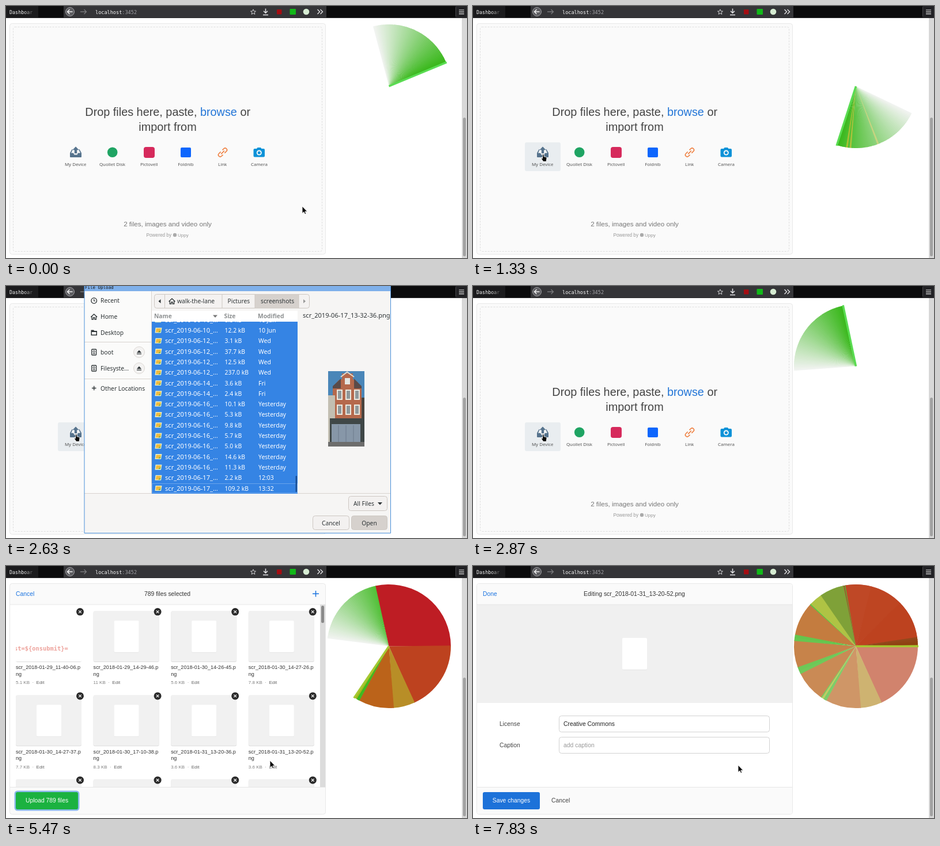
Recreate the animation shown at these times as an HTML page with a canvas. Size 800 by 438 pixels, loop 8000 ms.

```html
<!DOCTYPE html>
<html lang="en">
<head>
<meta charset="utf-8">
<title>Dashboard</title>
<style>
html, body { margin: 0; width: 100%; height: 100%; overflow: hidden; background: #fff; }
#stage { position: absolute; left: 0; top: 0; width: 800px; height: 438px; overflow: hidden; }
#stage > * { position: absolute; left: 0; top: 0; display: block; }
#stage > canvas { left: 552px; top: 27px; }
text { white-space: pre; }
.a { font-family: "Liberation Sans", Arial, sans-serif; }
.n { font-family: "Noto Sans", "Open Sans", sans-serif; }
.m { font-family: "DejaVu Sans Mono", monospace; }
</style>
</head>
<body>
<div id="stage">
  <svg id="page" width="800" height="438"></svg>
  <canvas id="wheel" width="225" height="225"></canvas>
  <svg id="over" width="800" height="438"></svg>
</div>
<script>
const $ = id => document.getElementById(id);
const text = (x, y, s, size, fill, cls = 'a', more = '') =>
  `<text x="${x}" y="${y}" font-size="${size}" fill="${fill}" class="${cls}" ${more}>${s}</text>`;
const rect = (x, y, w, h, fill, r = 0, stroke = 'none', more = '') =>
  `<rect x="${x}" y="${y}" width="${w}" height="${h}" fill="${fill}" rx="${r}" stroke="${stroke}" ${more}/>`;
const line = (d, stroke, w = 1, more = '') =>
  `<path d="${d}" fill="none" stroke="${stroke}" stroke-width="${w}" ${more}/>`;
const shape = (d, fill, more = '') => `<path d="${d}" fill="${fill}" ${more}/>`;
const dot = (x, y, r, fill, more = '') => `<circle cx="${x}" cy="${y}" r="${r}" fill="${fill}" ${more}/>`;
const clip = (x, y, w, h, inner) => `<svg x="${x}" y="${y}" width="${w}" height="${h}">${inner}</svg>`;
const group = (id, inner) => `<g id="${id}">${inner}</g>`;
const mid = 'text-anchor="middle"';
const blue = '#1a73e0';

// ---- browser chrome
function chrome() {
  return rect(0, 0, 800, 21, '#0b0b0c') + rect(0, 0, 56, 20, '#1b1b1d') + rect(100, 0, 456, 20, '#353538') +
    rect(780, 0, 20, 20, '#222225') + rect(0, 20, 800, 1, '#2a2a2c') +
    '<defs><linearGradient id="fade" gradientUnits="userSpaceOnUse" x1="30" x2="48" y1="0" y2="0">' +
    '<stop stop-color="#f4f4f4"/><stop offset="1" stop-color="#444"/></linearGradient></defs>' +
    text(6, 13.5, 'Dashboar', 8.4, 'url(#fade)', 'm') +
    text(155, 13.5, 'localhost<tspan fill="#a0a0a4">:3452</tspan>', 8.55, '#f6f6f6', 'm') +
    dot(111, 10, 7.500, '#5c5c60', 'stroke="#a0a0a4"') + line('M115.500 10H107M110.500 6L106.500 10L110.500 14', '#f0f0f0', 1.5) +
    line('M129 10H139.500M135.500 6L139.500 10L135.500 14', '#78787b', 1.3) +
    line('M429 5.800L430.300 8.900L433.500 9.100L431 11.200L431.900 14.400L429 12.600L426.100 14.400L427 11.200L424.500 9.100L427.700 8.900Z', '#d0d0d2', 1) +
    line('M450.500 4.500V12M447 8.800L450.500 12.300L454 8.800M446 15.500H455', '#e4e4e6', 1.5) +
    rect(470, 6, 8.500, 8.500, '#a40d12', 1) + rect(492.500, 5, 10.500, 10, '#12b818', 1) +
    dot(521, 10, 5.300, '#d6ecd2') +
    line('M540.500 6L544.500 10L540.500 14M545.500 6L549.500 10L545.500 14', '#e4e4e6', 1.4) +
    line('M780.500 2V18', '#4a4a4c') + line('M786 7H795M786 10.300H795M786 13.600H795', '#eee', 1.2) +
    rect(791, 21, 9, 417, '#d8d8d8') + rect(793, 194, 5, 241, '#a2a2a2', 2.500);
}

// ---- drop area
function dropArea() {
  const labels = ['My Device', 'Quollet Disk', 'Pictovell', 'Foldnib', 'Link', 'Camera'];
  let s = rect(12.5, 36.5, 536, 390, 'none', 3, '#dedede', 'stroke-dasharray="3 2"') +
    text(280.700, 191, 'Drop files here, paste, <tspan fill="#2275d7">browse</tspan> or', 19.85, '#444', 'a', mid) +
    text(280.500, 217, 'import from', 19.85, '#444', 'a', mid) +
    group('hover', rect(90, 237, 62, 50, '#e9edf0', 3));
  labels.forEach((l, i) => s += text(120.700 + 63.75 * i, 277.700, l, 7.9, '#555', 'n', mid));
  return s +
    shape('M114.500 249H127.500L131 255.500V262Q131 263 130 263H112Q111 263 111 262V255.500Z', '#56738d') +
    shape('M115.500 250.500H126.500L129 255.500H125L123.500 258.500H118.500L117 255.500H113Z', '#fafafa') +
    shape('M121 244L127 250.500H123.500V256.500H118.500V250.500H115Z', '#56738d', 'stroke="#fafafa" stroke-width=".6"') +
    dot(184.700, 254.300, 8.800, '#1fa463') + rect(239, 245, 19, 19, '#d62a5c', 4) + rect(303, 246, 18, 17, '#0d66fd', 2) +
    '<g transform="translate(376 254.500) rotate(-45)" fill="none" stroke="#ef8143" stroke-width="1.7">' +
    '<path d="M-1.500 -3.200H-6a3.200 3.200 0 0 0 0 6.400H-2.500M1.500 3.200H6a3.200 3.200 0 0 0 0 -6.400H2.500M-4 0H4"/></g>' +
    shape('M431.500 248H435L436.500 246H442L443.500 248H447Q449 248 449 250V260.500Q449 262.500 447 262.500H431.500Q429.500 262.500 429.500 260.500V250Q429.500 248 431.500 248Z', '#0e92d8') +
    dot(439.300, 255, 4.500, '#fafafa') + dot(439.300, 255, 2.600, '#0e92d8') +
    text(280.500, 382.500, '2 files, images and video only', 11.65, '#777', 'a', mid) +
    text(243.500, 400.500, 'Powered by', 8.25, '#999') + dot(293, 398, 3.200, '#aaa') +
    text(298, 400.500, 'Uppy', 8.1, '#999');
}

// ---- file grid
const names = ['29_11-40-06', '29_14-29-46', '30_14-26-45', '30_14-27-26',
  '30_14-27-37', '30_17-10-38', '31_13-20-36', '31_13-20-52'];
const sizes = ['5.1', '11', '5.6', '7.8', '7.7', '8.3', '3.6', '3.6'];
const tiny = (x, y, s, more) => text(x, y, s, 5, '#666', 'n', more);
const white = rect(0, 0, 114, 88, '#fff', 2);
const thumbs = [
  white + text(-3, 69, 'st=${onsubmit}=', 10.4, '#e8857c', 'm', 'font-weight="bold" opacity=".75" style="filter:blur(.7px)"'),
  white + text(0, 12, 'Environment Variables', 7, '#3aa648', 'n', 'font-weight="bold"') + dot(70, 9, 1.500, '#888') +
    tiny(0, 24, 'ng default environment variables are available to all builds') +
    rect(0, 31, 6, 5, '#e4e4e4') + rect(0, 37, 20, 5, '#e4e4e4') + rect(0, 43, 50, 6, '#ddd') + rect(0, 50, 58, 6, '#ddd') +
    rect(0, 57, 60, 6, '#ccc') + ['=', '=true', 'UBUS_INTEGRATION=true', 'd_PRIORITY=noninteractive', 'BIAN_FRONTEND=noninteractive'].map((s, i) =>
      text(1, 35.200 + 6.500 * i, s, 4.4, '#222', 'm')).join('') +
    tiny(0, 70, 'travis (do not depend on this value; do not override this)') +
    tiny(0, 78, '/home/travis (do not depend on this value)') + text(1, 85.500, 'en_US.UTF-8', 4.6, '#222', 'm'),
  white + tiny(2, 8, 'RESET PASSWORD', 'opacity=".6" style="font-size:2.500px"') + rect(0, 38, 114, 11, '#96134f') +
    text(60, 45.200, 'RESET PASSWORD', 4.6, '#f0d4e0', 'n', mid),
  white + text(2, 6, 'Request ▾', 3.8, '#555', 'n') + text(25, 6, 'Cookies (1)', 3.2, '#a77', 'n') +
    line('M0 9.500H114', '#ddd', .7) + tiny(2, 14, 'RESET PASSWORD', 'opacity=".6" style="font-size:2.500px"') +
    rect(5, 40, 109, 10, '#96134f') + text(60, 46.800, 'RESET PASSWORD', 4.6, '#f0d4e0', 'n', mid),
  text(3, 11.500, 'scr_2018-01-30_14-27', 11.5, '#333'),
  white + tiny(3, 9, 'RESET PASSWORD', 'opacity=".6"')
];
const sheet = (x, y) => rect(x, y + .8, 43, 55, '#e2e2e2', 2) + rect(x, y, 43, 55, '#fff', 2);
const cross = (x, y) => dot(x, y, 6.500, '#2b2b2b') +
  line(`M${x - 2.300} ${y - 2.300}l4.600 4.600m0 -4.600l-4.600 4.600`, '#fff', 1.2);

function grid() {
  let cards = '';
  for (let i = 0; i < 12; i++) {
    const x = 17 + 134.6 * (i % 4), y = 78 + 146.3 * (i >> 2);
    cards += rect(x, y + 1, 114, 88, '#dcdcdc', 3) + rect(x, y, 114, 88, '#f1f1f1', 3) + sheet(x + 36, y + 17);
    if (thumbs[i]) cards += group('thumb' + i, clip(x, y, 114, 88, rect(0, 0, 114, 88, '#f1f1f1', 2) + thumbs[i]));
    cards += cross(x + 111.500, y + 1.600);
    if (names[i]) cards += text(x, y + 101.300, 'scr_2018-01-' + names[i] + '.p', 9.1, '#333') + text(x, y + 112.600, 'ng', 9.1, '#333') +
      text(x, y + 127.300, sizes[i] + ' KB  ·  <tspan fill="#666">Edit</tspan>', 8, '#808080');
  }
  return rect(7, 67, 547, 317, '#fff') + clip(0, 67, 545, 317, `<g transform="translate(0 -67)">${cards}</g>`) +
    rect(545, 67, 9, 317, '#dcdcdc') + rect(547, 69, 5, 30, '#8a8a8a', 2.5) +
    line('M7 67H554M7 384.500H554', '#e6e6e6') +
    text(17, 51.500, 'Cancel', 10.35, blue) + text(280, 51.500, '789 files selected', 10.35, '#333', 'a', mid) +
    line('M532 48.300H543M537.500 43V53.600', blue, 1.5) +
    group('glow', rect(16, 392, 110, 32, '#1bb240', 4, '#8ab9ea', 'stroke-width="3"')) +
    rect(17, 393, 108, 30, '#1bb240', 3) + text(71, 410.500, 'Upload 789 files', 10.35, '#fff', 'a', mid);
}

// ---- edit card
function editCard() {
  return rect(7, 31, 547, 400, '#fafafa', 3) + rect(7, 67, 547, 171, '#f0f0f0') + rect(7, 238, 547, 146, '#fff') +
    line('M7 67H554M7 384.500H554', '#e6e6e6') + sheet(259, 125) +
    text(17, 51.500, 'Done', 10.35, blue) +
    text(280, 51.500, 'Editing scr_2018-01-31_13-20-52.png', 10.45, '#333', 'a', mid) +
    text(46, 277.500, 'License', 10.35, '#444') + text(46, 314.500, 'Caption', 10.35, '#444') +
    rect(149.500, 260.500, 365, 28, '#fff', 4, '#d2d2d2') + rect(149.500, 297.500, 365, 28, '#fff', 4, '#d2d2d2') +
    text(157, 277.500, 'Creative Commons', 10.4, '#222') + text(157, 314.500, 'add caption', 10.4, '#999') +
    rect(17, 393, 99, 30, '#1d72d9', 3) + text(66.500, 410.500, 'Save changes', 10.3, '#fff', 'a', mid) +
    text(136, 410.500, 'Cancel', 10.35, '#444');
}

// ---- file dialog
const files = [['10', '8.5', '10 Jun'], ['10', '12.2', '10 Jun'], ['12', '3.1', 'Wed'], ['12', '37.7', 'Wed'], ['12', '12.5', 'Wed'],
  ['12', '237.0', 'Wed'], ['14', '3.6', 'Fri'], ['14', '2.4', 'Fri'], ['16', '10.1', 'Yesterday'], ['16', '5.3', 'Yesterday'],
  ['16', '9.8', 'Yesterday'], ['16', '5.7', 'Yesterday'], ['16', '5.0', 'Yesterday'], ['16', '14.6', 'Yesterday'],
  ['16', '11.3', 'Yesterday'], ['17', '2.2', '12:03'], ['17', '109.2', '13:32']];
function rows(back, ink) {
  const body = files.map(([day, size, when], i) => {
    const y = .700 + 18.3 * i;
    return shape(`M6.500 ${y - 8.500}h11l-1.500 9h-10.500z`, '#eef5c8') + shape(`M7.800 ${y - 7.200}h8.200l-1.200 6.400h-8z`, '#f0b93f') +
      shape(`M11 ${y - .800}l4.500 -3.500l-.600 3.500z`, '#6fb04a') +
      text(23, y, `scr_2019-06-${day}_…`, 11.1, ink, 'n') + text(126.500, y, size + ' kB', 10.4, ink, 'n') + text(185, y, when, 10.5, ink, 'n');
  }).join('');
  return clip(253, 62, 253, 299, rect(0, 0, 253, 299, back) + body);
}
function house() {
  let s = rect(0, 0, 63, 131, '#4a86b8') + shape('M8 131V28L18 16L24 14V4H43V14L50 18L58 28V131Z', '#b5694c') +
    line('M22 10L33 1.500L45 10', '#e4dccd', 2) + shape('M8 30V26L22 13V30ZM45 30V13L58 26V30Z', '#5a4a48') +
    rect(29, 12, 9, 11, '#e4e6e2') + rect(0, 42, 12, 89, '#c3bfb2') + rect(58, 46, 5, 85, '#49443f');
  for (const y of [32, 58]) for (const x of [15, 30, 45]) s += rect(x, y, 10, 18, '#ece8de') + rect(x + 2, y + 2, 6, 14, '#8f989a');
  return clip(559, 148, 63, 131, s + rect(3, 82, 60, 49, '#3f4747') + rect(6, 92, 50, 31, '#8797a8') +
    line('M18 94V123M31 94V123M44 94V123', '#6c7b8c') + rect(0, 123, 63, 8, '#6d6d6c'));
}
const button = (x, y, w, h, fill) => rect(x + .5, y + .5, w - 1, h - 1, fill, 4, '#cdc7c2');
function dialog() {
  const ink = '#2e3436', n = (x, y, s, more) => text(x, y, s, 10.3, ink, 'n', more);
  const eject = y => dot(231, y, 9.500, '#f4f3f2', 'stroke="#dcd8d4"') + shape(`M227 ${y + 1}L231 ${y - 3.500}L235 ${y + 1}Z`, ink) + rect(227, y + 2.300, 8, 1.300, ink);
  const disk = y => rect(148.700, y - 5, 8, 10, 'none', 1, ink, 'stroke-width="1.300"') + dot(152.700, y - 1, 1.700, 'none', `stroke="${ink}"`) + rect(150.500, y + 2, 4.500, 1, ink);
  const home = (x, y) => line(`M${x - 5.500} ${y + .500}l5.500 -5l5.500 5M${x - 3.700} ${y - .500}v5h2.500v-3h2.400v3h2.500v-5`, ink, 1.3);
  return rect(136, 0, 531, 429, '#f6f5f4') + rect(136, 0, 531, 9, '#7fb0ea') + text(137, 5.300, 'File Upload', 7.5, '#111', 'm') +
    rect(136, 9, 116, 351, '#fbfbfa') + line('M252.500 9V360M136 97.500H252M136 161.500H252M136 360.500H667', '#d8d3cf') +
    dot(152.700, 25.500, 4.800, 'none', `stroke="${ink}" stroke-width="1.300"`) + line('M152.700 22.500V26H155', ink, 1.2) + home(152.700, 53.500) +
    shape('M147.500 76.500H152L153.500 78H158V86H147.500Z', ink) + rect(149, 80, 7.500, 4.500, '#fbfbfa') +
    disk(115) + disk(143) + line('M149 177.500H156.500M152.700 173.700V181.300', ink, 1.4) +
    n(164, 29.200, 'Recent') + n(164, 57.200, 'Home') + n(164, 85.200, 'Desktop') + n(164, 119, 'boot') + n(164, 147, 'Filesyste…') +
    n(164, 181.500, 'Other Locations') + eject(115) + eject(143) +
    button(257, 14, 270, 25, '#f4f2f1') + rect(432, 14.500, 76, 24, '#d6d1cd') + line('M275.500 14V39M375 14V39M432 14V39M508 14V39', '#cdc7c2') +
    shape('M268.500 23V30L264.500 26.500Z', ink) + shape('M516 23V30L520 26.500Z', '#999') + home(288, 26.500) +
    n(297, 30, 'walk-the-lane') + n(384.500, 30, 'Pictures') + n(442, 30, 'screenshots') +
    rect(253, 43, 253, 19, '#fff') + [[257, 'Name'], [378.500, 'Size'], [437, 'Modified']].map(([x, s]) =>
      text(x, 56, s, 10.3, '#8e9192', 'n', 'font-weight="600"')).join('') + shape('M359 50.500H367L363 55Z', '#777') +
    rows('#fff', ink) +
    group('picked', rows('#3584e4', '#fff') + rect(253.500, 343.500, 252, 16, 'none', 0, '#9cc3f2', 'stroke-dasharray="1 1"') +
      rect(502.500, 330, 2.500, 28, '#1c4f92', 1) + clip(507, 43, 160, 20, text(8, 11.700, 'scr_2019-06-17_13-32-36.png', 11.1, ink, 'n')) + house()) +
    button(594, 365, 68, 26, '#f3f1f0') + n(603, 382, 'All Files') + shape('M645 376H653L649 380.500Z', ink) +
    button(532, 399, 64, 25, '#f3f1f0') + n(564, 415.500, 'Cancel', mid) + button(599, 399, 63, 25, '#d6d1cd') + n(630.500, 415.500, 'Open', mid) +
    line('M136 0V429.500H667.500V0', '#4a90d9');
}

$('page').innerHTML = chrome() + rect(6.500, 30.500, 548, 401, '#fafafa', 4, '#e8e8e8') +
  group('drop', dropArea()) + group('grid', grid()) + clip(6, 31, 549, 400, group('edit', editCard()));
$('over').innerHTML = group('dialog', dialog()) +
  '<g id="cursor" fill="#0a0a0a" stroke="#fff" stroke-width=".9" stroke-linejoin="round">' +
  '<path id="arrow" d="M0 0V12.500L2.900 9.900L4.800 14L6.800 13.100L5 9.200H8.800Z"/>' +
  '<path id="hand" d="M-.400 .300Q.800 -1.200 2 .300V3.600L5.800 4.600Q7.200 5 7 6.800L6.200 12.300H.800L-2.400 7.400Q-2.100 5.600 -.400 7Z"/></g>';

// ---- frame-time wheel
const tones = { g: [58, 184, 28], y: [160, 185, 30], m: [180, 135, 25], o: [184, 92, 15],
  k: [184, 50, 12], r: [184, 6, 14], v: [105, 145, 20], b: [140, 60, 12] };
const hands = { g: '#5adc52', y: '#a6c832' };
// time, hand angle, tone
const slow = [[4600, 360, 'r'], [4800, 426, 'k'], [4830, 446, 'm'], [5370, 479, 'o'], [5400, 480.5, 'g'], [5430, 482, 'g'],
  [5470, 484, 'y'], [5500, 485, 'g'], [5600, 514, 'o'], [5870, 517, 'g'], [5900, 520.7, 'g'], [6100, 545.6, 'o'], [6130, 548.5, 'g'],
  [6170, 551.5, 'g'], [6370, 582.7, 'o'], [6370, 583.7, 'g'], [6600, 596, 'y'], [6630, 619, 'v'], [6630, 620, 'b'], [6630, 620.7, 'g'],
  [6930, 645, 'k'], [7200, 676, 'k'], [7530, 712, 'k'], [7600, 714, 'b'], [7670, 716, 'b'], [7730, 718, 'b'], [7800, 719.5, 'b'], [7830, 720, 'y']];
const pen = $('wheel').getContext('2d');
const rad = d => d * Math.PI / 180;
const fastAngle = k => -22.6 + 1.632 * k;
const janky = [57, 73, 75];

function wedge(from, to, tone, fade) {
  const c = tones[tone].map(v => Math.round(v + (244 - v) * Math.min(1, fade)));
  pen.fillStyle = `rgb(${c})`;
  pen.beginPath();
  pen.moveTo(0, 0);
  pen.arc(0, 0, 107.5, rad(from - .6), rad(to));
  pen.fill();
}
function drawWheel(t) {
  const now = Math.min(172, 2 * Math.floor((t + 4) * .03));
  const done = slow.filter(s => s[0] <= t);
  pen.setTransform(1, 0, 0, 1, 0, 0);
  pen.clearRect(0, 0, 225, 225);
  pen.translate(112.5, 112.5);
  for (let k = now - 49 + done.length; k <= now; k++)
    wedge(fastAngle(k - 1), fastAngle(k), janky.includes(k) ? 'y' : 'g', .02 * (now - k + done.length));
  let angle = fastAngle(now), tone = 'g';
  done.forEach(([, to, c], i) => {
    wedge(angle, to, c, .016 * (done.length - 1 - i));
    angle = to;
    tone = c;
  });
  pen.strokeStyle = hands[tone] || `rgb(${tones[tone]})`;
  pen.lineWidth = 3.5;
  pen.beginPath();
  pen.moveTo(0, 0);
  pen.lineTo(108.5 * Math.cos(rad(angle)), 108.5 * Math.sin(rad(angle)));
  pen.stroke();
}

// ---- timeline
const moves = [ // start, end, then three points of a curve
  [70, 800, 514, 348, 290, 350, 121, 258], [3940, 4130, 121, 258, 340, 262, 562, 222],
  [4940, 5440, 562, 222, 500, 270, 458, 338], [5840, 5900, 458, 338, 459, 342, 460, 346]];
const thumbTimes = [5370, 5600, 6100, 6370, 6600, 7200];
const part = (t, a, b) => Math.max(0, Math.min(1, (t - a) / (b - a)));
const show = (id, on) => $(id).style.display = on ? '' : 'none';

function pointer(t) {
  const [a, b, x0, y0, cx, cy, x1, y1] = moves.filter(m => m[0] <= t).pop() || moves[0];
  const p = part(t, a, b), u = p * p * (3 - 2 * p), v = 1 - u;
  const at = (s, c, e) => v * v * s + 2 * u * v * c + u * u * e;
  $('cursor').setAttribute('transform', `translate(${at(x0, cx, x1)} ${at(y0, cy, y1)})`);
  const hand = t >= 770 && t < 4600 || t >= 5870 && t < 7530;
  show('hand', hand);
  show('arrow', !hand);
}
function render(t) {
  const q = Math.floor((t + 4) * .03) / .03;
  drawWheel(t);
  pointer(q);
  show('drop', t < 4600);
  show('hover', t >= 770);
  show('grid', t >= 4600);
  show('glow', t >= 4800 && t < 6930);
  thumbTimes.forEach((at, i) => show('thumb' + i, t >= at));
  const fade = part(q, 1470, 1570) * (1 - part(q, 2760, 2860));
  show('dialog', fade > 0);
  $('dialog').style.opacity = fade;
  show('picked', t >= 1930);
  const slide = 1 - (1 - part(q, 7500, 7800)) ** 2;
  show('edit', slide > 0);
  $('edit').setAttribute('transform', `translate(-6 ${-31 - 420 * (1 - slide)})`);
  $('edit').style.opacity = slide;
}
const start = performance.now();
function tick() {
  render((performance.now() - start) % 8000);
  requestAnimationFrame(tick);
}
tick();
</script>
</body>
</html>
```
